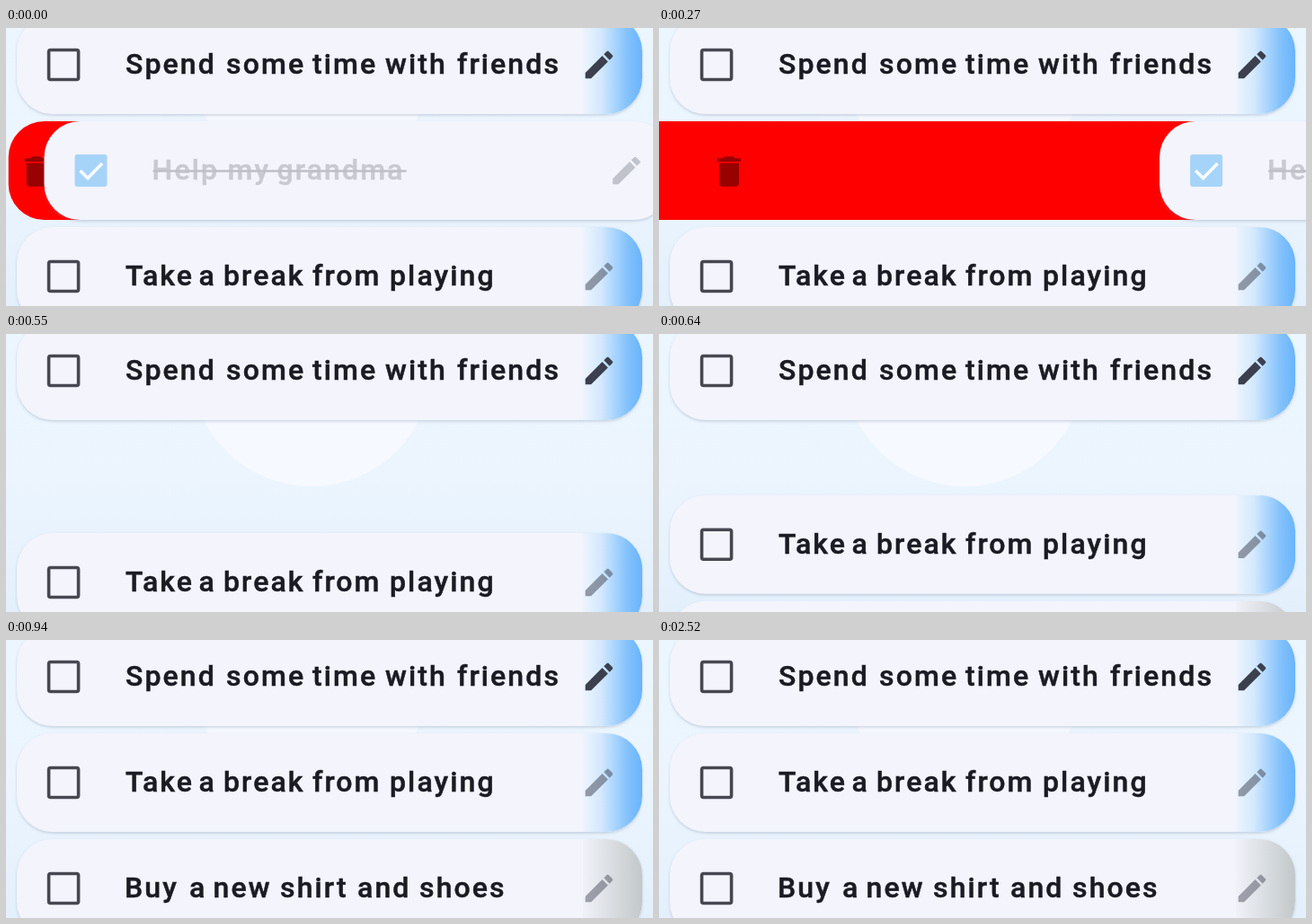
Recreate the animation shown at these times as an HTML page. Size 720x310 px, loop 2560 ms.

```html
<!DOCTYPE html>
<html lang="en">
<head>
<meta charset="utf-8">
<title>Swipe to delete</title>
<style>
  html, body { margin: 0; width: 100%; height: 100%; overflow: hidden; background: #ebf5ff; }
  svg { display: block; width: 720px; height: 310px; }
  text { font: 500 32px Roboto, sans-serif; letter-spacing: 2.1px; stroke-width: .5px; }
</style>
</head>
<body>
<svg id="stage" viewBox="0 0 720 310">
  <defs>
    <linearGradient id="sky" x2="0" y2="1">
      <stop stop-color="#ebf6ff"/>
      <stop offset=".5" stop-color="#ecf5fe"/>
      <stop offset="1" stop-color="#e3f0fc"/>
    </linearGradient>
    <linearGradient id="blue">
      <stop stop-color="#edf4fd"/>
      <stop offset=".3" stop-color="#d4e9fd"/>
      <stop offset=".75" stop-color="#83c2fc"/>
      <stop offset="1" stop-color="#69b4fb"/>
    </linearGradient>
    <linearGradient id="gray">
      <stop stop-color="#f1f2f9"/>
      <stop offset="1" stop-color="#c2c8c9"/>
    </linearGradient>
    <filter id="shade" x="-5%" y="-10%" width="110%" height="125%">
      <feDropShadow dx="0" dy="1.5" stdDeviation="1.8" flood-color="#7c8ca4" flood-opacity=".36"/>
    </filter>
    <clipPath id="round"><rect x="12" width="696" height="110" rx="40"/></clipPath>
    <path id="pen" d="M3 17.25V21h3.75L17.81 9.94l-3.75-3.75L3 17.25zM20.71 7.04c.39-.39.39-1.02 0-1.41l-2.34-2.34c-.39-.39-1.02-.39-1.41 0l-1.83 1.83 3.75 3.75 1.83-1.83z"/>
    <path id="bin" d="M6 19c0 1.1.9 2 2 2h8c1.1 0 2-.9 2-2V7H6v12zM19 4h-3.5l-1-1h-5l-1 1H5v2h14V4z"/>
  </defs>
  <rect width="720" height="310" fill="url(#sky)"/>
  <circle cx="340" cy="36" r="134" fill="#f6f9ff"/>
  <g id="list"></g>
  <g id="top">
    <rect id="red" y="104" height="110" rx="40" fill="#f00"/>
    <g id="trash"><use href="#bin" transform="scale(1.85) translate(-12 -12)" fill-opacity=".4"/></g>
  </g>
</svg>
<script>
const $ = id => document.getElementById(id);
const LOOP = 2560, SWIPE = 545, GONE = 550, CLOSE = 553, SETTLE = 387;
const PITCH = 118, TOP = -14, GRIP = 28;

const words = (text, xs) => text.split(' ')
  .map((w, i) => `<tspan x="${xs[i]}">${w}</tspan>`).join(' ');

function card({ text, xs, tint, pen, done }) {
  const ink = done ? '#c9c9d1' : '#1b1b23';
  const box = done
    ? `<rect x="46" y="37" width="36" height="36" rx="3" fill="#a6d4f8"/>
       <path d="M52 55l8.5 8.5L76.5 47" fill="none" stroke="#f8fbff" stroke-width="3.6"/>`
    : `<rect x="47.6" y="38.5" width="33" height="33" rx="2" fill="none" stroke="#474752" stroke-width="3.6"/>`;
  return `<rect x="12" width="696" height="110" rx="40" fill="#f4f4fd" filter="url(#shade)"/>
    ${tint ? `<rect x="642" width="66" height="110" fill="url(#${tint})" clip-path="url(#round)"/>` : ''}
    ${box}
    <text y="65" fill="${ink}" stroke="${ink}">${words(text, xs)}</text>
    ${done ? '<path d="M133 55.5H415" stroke="#bfbfc8" stroke-width="2.5"/>' : ''}
    <use href="#pen" transform="translate(660 55) scale(1.7) translate(-12 -12)" fill="#3b3f4e" fill-opacity="${pen}"/>`;
}

function add(parent, data) {
  const g = document.createElementNS('http://www.w3.org/2000/svg', 'g');
  g.innerHTML = card(data);
  parent.append(g);
  return g;
}

const move = (el, x, y) => el.setAttribute('transform', `translate(${x} ${y})`);

const first = add($('list'), { text: 'Spend some time with friends', xs: [133, 245, 341, 422, 502], tint: 'blue', pen: 1 });
const next = [
  add($('list'), { text: 'Take a break from playing', xs: [133, 214.5, 242, 341, 427], tint: 'blue', pen: .5 }),
  add($('list'), { text: 'Buy a new shirt and shoes', xs: [132, 204, 230.5, 305, 391, 460], tint: 'gray', pen: .45 })
];
const swiped = add($('top'), { text: 'Help my grandma', xs: [132, 216, 271], pen: .28, done: true });
move(first, 0, TOP);

const clamp = u => Math.min(1, Math.max(0, u));
const easeOut = u => 1 - (1 - u) ** 2;

// cubic-bezier(.25, .1, .25, 1)
function ease(u) {
  const at = (s, a, b) => 3 * s * (1 - s) ** 2 * a + 3 * s * s * (1 - s) * b + s ** 3;
  let lo = 0, hi = 1;
  for (let i = 0; i < 24; i++) {
    const mid = (lo + hi) / 2;
    if (at(mid, .25, .25) < u) lo = mid; else hi = mid;
  }
  return at(hi, .1, 1);
}

function draw(t) {
  const open = t < GONE;
  $('top').style.display = open ? '' : 'none';
  if (open) {
    const x = GRIP + (720 - GRIP) * easeOut(clamp(t / SWIPE));
    const pull = (x - GRIP) / 2;
    const left = 4 - pull;
    move(swiped, x, TOP + PITCH);
    $('red').setAttribute('x', left);
    $('red').setAttribute('width', x + 120 - left);
    move($('trash'), Math.min(78, 32.5 + pull), 160);
  }
  const up = ease(clamp((t - CLOSE) / SETTLE));
  next.forEach((g, i) => move(g, 0, TOP + PITCH * (i + 2 - up)));
}

const start = performance.now();
function tick() {
  draw((performance.now() - start) % LOOP);
  requestAnimationFrame(tick);
}
tick();
</script>
</body>
</html>
```
